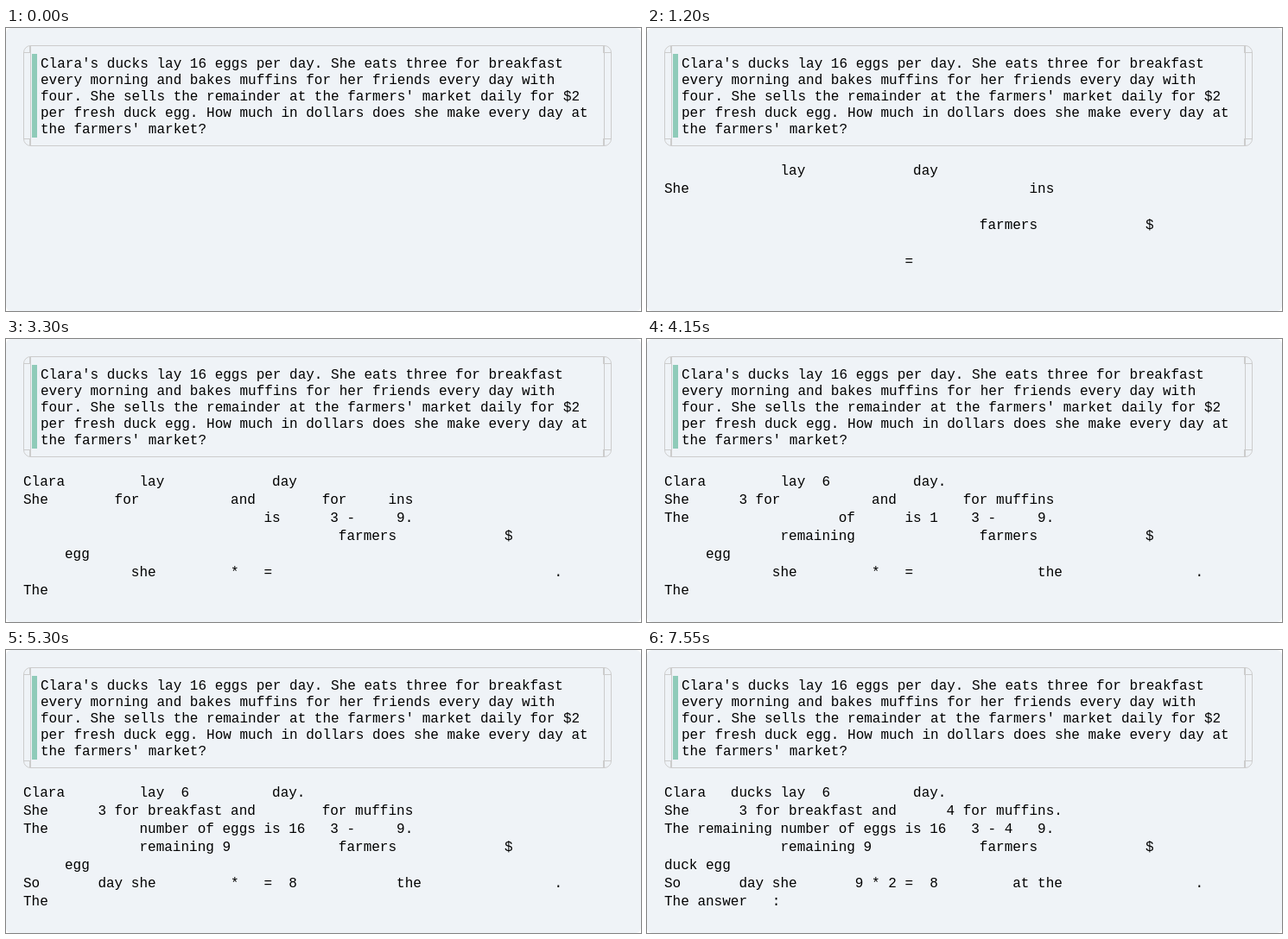
Write an HTML page that moves like this. It is 735x328 px and loops after 8000 ms.

```html
<!DOCTYPE html>
<html lang="en">
<head>
<meta charset="utf-8">
<title>Words filling in an answer</title>
<style>
  html, body { margin: 0; width: 100%; height: 100%; overflow: hidden; background: #fff; }
  #stage {
    position: relative; width: 735px; height: 328px; overflow: hidden;
    background: #eff3f7; border-radius: 6px;
    font: 16px/18px "Liberation Mono", monospace; color: #000;
  }
  #stage span { position: absolute; white-space: pre; }
  svg { position: absolute; left: 0; top: 0; fill: none; stroke: #ccc; }
</style>
</head>
<body>
<div id="stage">
  <svg width="735" height="328">
    <rect x="20.5" y="20.5" width="680" height="116" rx="8"/>
    <path d="M28.5 20V137M692.5 20V137"/>
    <path d="M20 28.5H28M27.5 21V29M20 128.5H28M27.5 128V136"/>
    <path d="M692 28.5H701M691.5 21V29M692 128.5H701M691.5 128V136"/>
    <rect x="30" y="30" width="6" height="97" fill="#8fcbb9" stroke="none"/>
  </svg>
</div>
<script>
const LOOP = 8000;
const stage = document.getElementById('stage');

const question = [
  "Clara's ducks lay 16 eggs per day. She eats three for breakfast",
  "every morning and bakes muffins for her friends every day with",
  "four. She sells the remainder at the farmers' market daily for $2",
  "per fresh duck egg. How much in dollars does she make every day at",
  "the farmers' market?"
];

// Each line of the answer: "time column word"
const answer = [
  '2150 0 Cla|1600 3 ra|6850 8 ducks|400 14 lay|3950 19 6|500 30 day|3550 33 .',
  '400 0 She|4000 9 3|1700 11 for|4800 15 breakfast|1750 25 and|5450 34 4|3300 36 for|4100 40 muff|600 44 ins|5850 47 .',
  '3650 0 The|7550 4 remaining|5300 14 number|4000 21 of|5300 24 eggs|1850 29 is|3800 32 1|4600 33 6|3300 37 3|3150 39 -|6900 41 4|1450 45 9.',
  '4150 14 remaining|4850 24 9|1200 38 farmers|950 58 $',
  '5500 0 duck|2600 5 egg',
  '4500 0 So|4900 9 day|3100 13 she|7300 23 9|2300 25 *|6300 27 2|700 29 =|5100 32 8|6950 42 at|4100 45 the|1600 64 .',
  '2150 0 The|5900 4 answer|5600 13 :'
];

function put(text, left, top) {
  const el = document.createElement('span');
  el.textContent = text;
  el.style.left = left;
  el.style.top = top + 'px';
  stage.append(el);
  return el;
}

question.forEach((line, i) => put(line, '40px', 33 + 19 * i));

const words = answer.flatMap((line, row) => line.split('|').map(entry => {
  const [time, col, text] = entry.split(' ');
  return { time: +time, el: put(text, `calc(20px + ${col}ch)`, 157 + 21 * row) };
}));

const start = performance.now();
function draw() {
  const t = Math.max(0, performance.now() - start) % LOOP;
  for (const { time, el } of words) {
    el.style.visibility = t >= time ? 'visible' : 'hidden';
  }
  requestAnimationFrame(draw);
}
draw();
</script>
</body>
</html>
```
